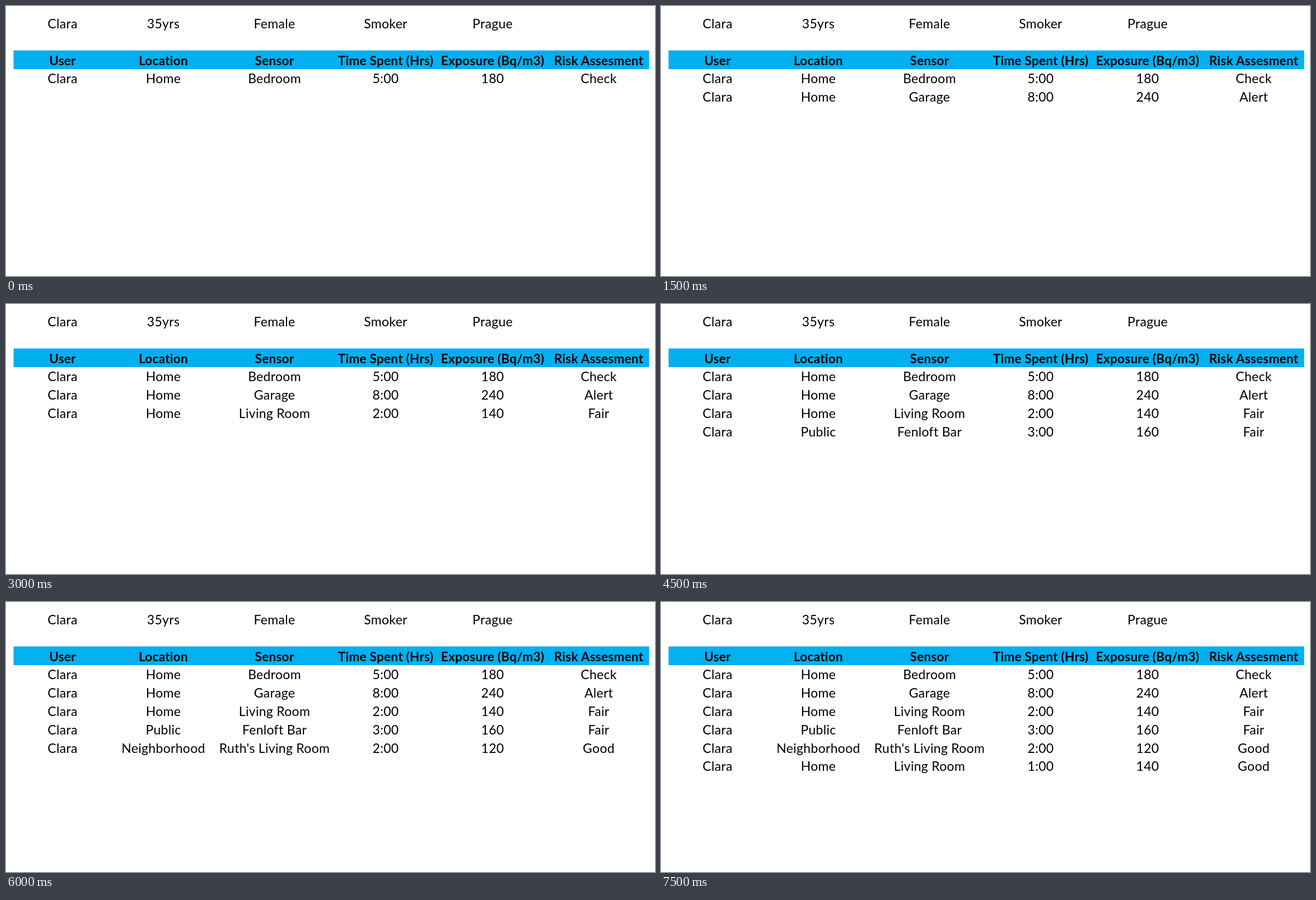
An HTML page that plays this animation: 1159 px wide and 483 px high, repeating every 8000 ms.

```html
<!DOCTYPE html>
<html lang="en">
<head>
<meta charset="utf-8">
<title>Exposure log</title>
<style>
  html, body { margin: 0; width: 100%; height: 100%; overflow: hidden; background: #fff; }
  svg { display: block; width: 100%; height: 100%; }
  text { font: 23px Lato, "Open Sans", sans-serif; letter-spacing: .3px; text-anchor: middle; fill: #000; }
  .head text { font-size: 22.5px; font-weight: 700; letter-spacing: .27px; }
</style>
</head>
<body>
<svg id="stage" viewBox="0 0 1159 483">
  <rect x="13.5" y="79.5" width="1135" height="33.5" fill="#00b0f0"/>
</svg>
<script>
const LOOP = 8000, STEP = 1500;
const FIRST_ROW = 138.4, ROW_HEIGHT = 32.8;
const COLUMNS = [101, 281, 479.5, 678, 869, 1058.5];
const USER = "Clara";

const profile = [USER, "35yrs", "Female", "Smoker", "Prague"];
const header = ["User", "Location", "Sensor", "Time Spent (Hrs)", "Exposure (Bq/m3)", "Risk Assesment"];
const visits = [
  ["Home", "Bedroom", "5:00", "180", "Check"],
  ["Home", "Garage", "8:00", "240", "Alert"],
  ["Home", "Living Room", "2:00", "140", "Fair"],
  ["Public", "Fenloft Bar", "3:00", "160", "Fair"],
  ["Neighborhood", "Ruth's Living Room", "2:00", "120", "Good"],
  ["Home", "Living Room", "1:00", "140", "Good"]
];

const stage = document.getElementById("stage");

function add(parent, tag, attrs) {
  const el = document.createElementNS("http://www.w3.org/2000/svg", tag);
  for (const name in attrs) el.setAttribute(name, attrs[name]);
  return parent.appendChild(el);
}

function addRow(cells, y, className = "row") {
  const row = add(stage, "g", { class: className });
  cells.forEach((cell, i) => {
    add(row, "text", { x: COLUMNS[i], y }).textContent = cell;
  });
  return row;
}

// Hidden until the given time, then shown for the rest of the loop.
function showFrom(el, time) {
  const offset = time / LOOP;
  el.animate([
    { opacity: 0, offset: 0 },
    { opacity: 0, offset },
    { opacity: 1, offset },
    { opacity: 1, offset: 1 }
  ], { duration: LOOP, iterations: Infinity });
}

addRow(profile, 40);
addRow(header, 106, "head");
visits.forEach((visit, i) => {
  const row = addRow([USER, ...visit], Math.round(FIRST_ROW + i * ROW_HEIGHT));
  if (i > 0) showFrom(row, i * STEP);
});
</script>
</body>
</html>
```
